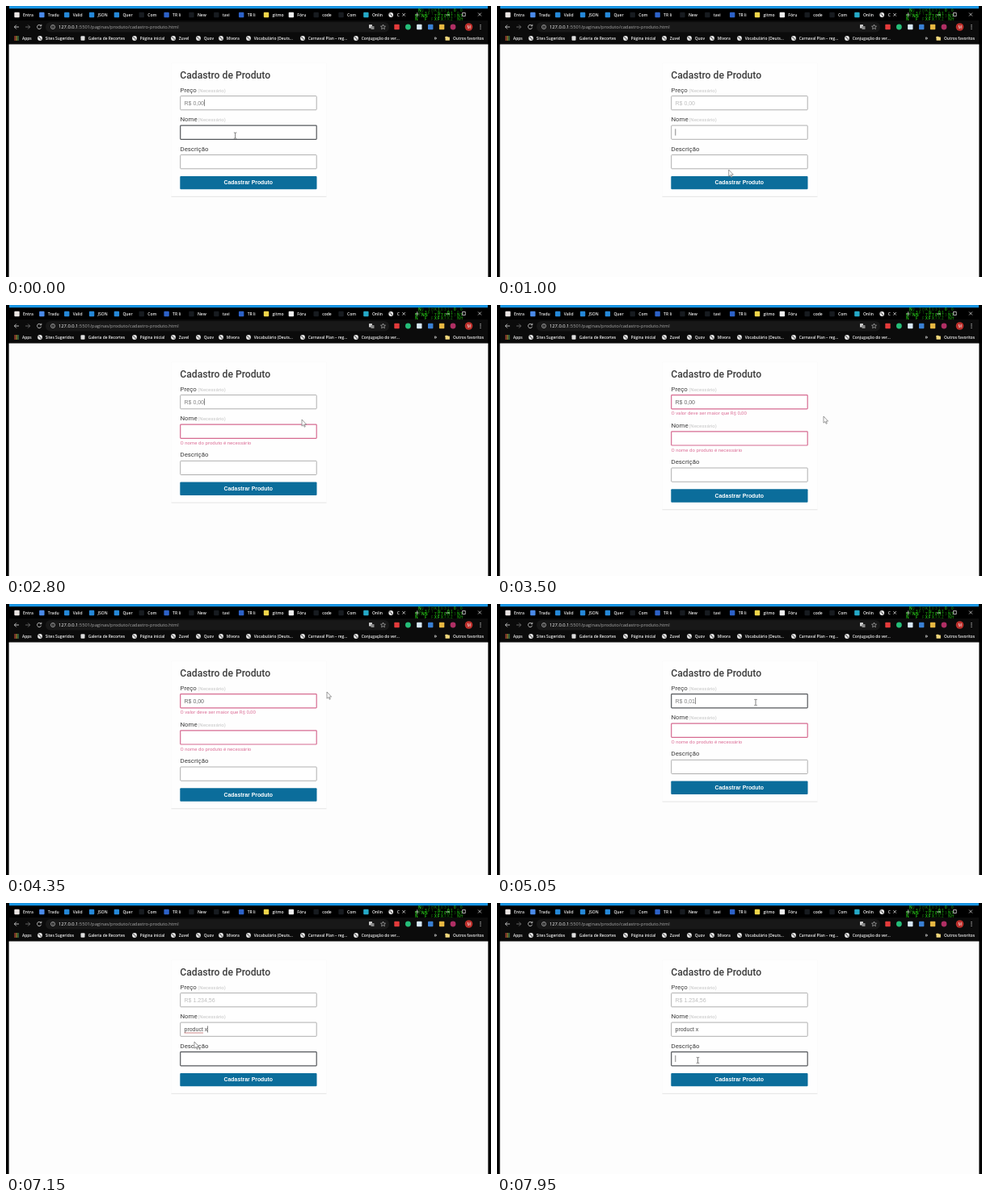
An HTML page that plays this animation: 600x336 px, repeating every 8000 ms.

```html
<!DOCTYPE html>
<html lang="pt-BR">
<head>
<meta charset="utf-8">
<title>Cadastro de Produto</title>
<style>
  html, body { margin: 0; width: 100%; height: 100%; overflow: hidden; background: #000; }
  svg { display: block; width: 600px; height: 336px; }
  text { white-space: pre; }
  .ui { font-family: "Open Sans", sans-serif; }
  .form { font-family: Roboto, sans-serif; fill: #3c3c3c; }
  .label { font-size: 7.85px; }
  .hint { font-size: 6.04px; fill: #c4c4c4; }
  .error { font-size: 6.08px; fill: #dc6f97; }
  .value { font: 7px "Liberation Sans", Arial, sans-serif; }
  .box { fill: #fff; }
</style>
</head>
<body>
<svg id="stage" viewBox="0 0 600 336">
  <rect width="600" height="336"/>
  <rect x="4" width="592" height="3.2" fill="#1995e3"/>
  <g id="chrome"></g>
  <rect x="3.6" y="47.5" width="592.8" height="288.5" fill="#fdfdfd"/>
  <g id="page"></g>
  <path id="arrow" d="M0 0V8.2L1.9 6.5 3.2 9.3 4.3 8.8 3.1 6.1H5.6Z" fill="#fff" stroke="#666" stroke-width=".65"/>
  <path id="beam" d="M-1.7-3.6H-.5L0-3.2.5-3.6H1.7M0-3.2V3.2M-1.7 3.6H-.5L0 3.2.5 3.6H1.7" fill="none" stroke="#555" stroke-width=".75"/>
</svg>
<script>
const LOOP = 8000, ERROR_HEIGHT = 8.7;
const byId = id => document.getElementById(id);
const chrome = byId('chrome'), page = byId('page');

function add(parent, tag, attrs, content) {
  const node = document.createElementNS('http://www.w3.org/2000/svg', tag);
  set(node, attrs);
  if (content !== undefined) node.textContent = content;
  parent.append(node);
  return node;
}
function set(node, attrs) {
  for (const key in attrs) node.setAttribute(key, attrs[key]);
}
const show = (node, on) => set(node, { visibility: on ? 'visible' : 'hidden' });
const uiText = (x, y, size, content, fill = '#f0f0f0', weight = 600) =>
  add(chrome, 'text', { x, y, class: 'ui', 'font-size': size, 'font-weight': weight, fill }, content);
const line = (d, stroke = '#ddd', width = .8) =>
  add(chrome, 'path', { d, stroke, 'stroke-width': width, fill: 'none' });
const dot = (cx, cy, r, fill) => add(chrome, 'circle', { cx, cy, r, fill });
const block = (x, y, width, height, fill, rx = 0) =>
  add(chrome, 'rect', { x, y, width, height, fill, rx });

function globe(x, y) {
  dot(x, y, 2.9, '#eee');
  line(`M${x - 2} ${y - 1}q2-1 2 1t2 1`, '#333', .8);
}

function drawTabs() {
  const tabs = [
    ['Entra', '#e9e4e2'], ['Tradu', '#4a8ae8'], ['Valid', '#2588d8'], ['JSON', '#2588d8'],
    ['Quer', '#2588d8'], ['Com', '#171b20'], ['TR li', '#2d62c8'], ['New', '#171b20'],
    ['tavi', '#171b20'], ['TR li', '#2d62c8'], ['gitmo', '#f0d54a'], ['Fóru', '#eee'],
    ['code', '#171b20'], ['Com', '#171b20'], ['Onlin', '#25a9c7'], ['C', null]
  ];
  tabs.forEach(([name, color], i) => {
    const x = 13.5 + i * 30.85;
    if (color) block(x - 3.2, 7.8, 6.4, 6.4, color, 1);
    else globe(x, 11);
    uiText(x + 7.5, 13, 5, name);
  });
  line('M490.3 9l3.6 3.6m0-3.6l-3.6 3.6M506 11h5.4M508.7 8.3v5.4');
}

function drawRain() {
  let seed = 17;
  const random = () => (seed = seed * 16807 % 2147483647) / 2147483647;
  const glyphs = '01ZXKNH7F3';
  for (let x = 506; x < 566; x += 4) {
    for (let y = 7; y < 20; y += 3.6) {
      if (random() < .25) continue;
      const fill = `hsl(115 85% ${16 + random() * 40 | 0}%)`;
      uiText(x, y, 4.6, glyphs[random() * glyphs.length | 0], fill);
    }
  }
  line('M544 11h5M564.5 8.5h3.8v4h-3.8zM584 8.5l4 4m0-4l-4 4', '#eee', .7);
}

function drawToolbar() {
  block(4, 18, 592, 30, '#0b0b0b');
  block(49, 20, 425, 12.5, '#181818', 6);
  line('M16 26h-5.6m2.4-2.5l-2.5 2.5 2.5 2.5');
  line('M24 26h5.6m-2.4-2.5l2.5 2.5-2.5 2.5', '#777');
  line('M43.2 24.4a2.6 2.6 0 1 0 .4 2.3M43.8 22.8v2h-2');
  add(chrome, 'circle', { cx: 58, cy: 26, r: 2.5, fill: 'none', stroke: '#ccc', 'stroke-width': .7 });
  line('M58 25.5v1.8M58 24.2v.6', '#ccc', .7);
  const url = uiText(65, 28, 5.76, '127.0.0.1', '#fff', 400);
  add(url, 'tspan', { fill: '#aaa' }, ':5501/paginas/produto/cadastro-produto.html');

  block(449, 23, 4, 4.5, '#ccc', .5);
  block(451.5, 25, 4, 4, '#888', .5);
  line('M466.5 23l.9 2 2.1.2-1.6 1.4.5 2.1-1.9-1.1-1.9 1.1.5-2.1-1.6-1.4 2.1-.2z', '#ccc', .6);
  ['#e33b3b', '#25bd79', '#d7e8f5', '#3a80d4', '#e8b842', '#b02f64'].forEach((fill, i) => {
    const x = 483.5 + i * 13.9;
    if (i === 1 || i === 5) dot(x, 26, 3.4, fill);
    else block(x - 3.2, 22.8, 6.4, 6.4, fill, .8);
  });
  dot(572.5, 26, 4.8, '#bd302c');
  uiText(570.4, 27.8, 5, 'M', '#fff', 400);
  for (const y of [23.7, 26, 28.3]) dot(587, y, .65, '#ddd');
}

function drawBookmarks() {
  const colors = ['#e35545', '#e8c145', '#55a865'];
  for (let i = 0; i < 9; i++) block(10.3 + i % 3 * 2, 37.3 + (i / 3 | 0) * 2, 1.4, 1.4, colors[i % 3]);
  uiText(20, 42, 4.85, 'Apps');
  const marks = [
    [42, 'Sites Sugeridos'], [95, 'Galeria de Recortes'], [159, 'Página inicial'],
    [207, 'Zuvel'], [238, 'Quov'], [266, 'Mivora'], [300, 'Vocabulário (Deuts...'],
    [367, 'Carnaval Plan – reg...'], [433, 'Conjugação do ver...']
  ];
  marks.forEach(([x, name], i) => {
    if (i === 1) block(x - 2.5, 37.3, 5, 5.4, '#ddd', 1);
    else globe(x, 40);
    uiText(x + 6.7, 42, 4.85, name);
  });
  uiText(529.5, 42, 6.5, '»');
  block(543.5, 37.8, 3, 2, '#f0d77c', .4);
  block(543.5, 38.4, 5.4, 4.3, '#f0d77c', .4);
  uiText(553, 42, 4.85, 'Outros favoritos');
}

drawTabs();
drawRain();
drawToolbar();
drawBookmarks();

const card = add(page, 'rect', { x: 204.5, y: 71, width: 192, fill: '#fefefe', stroke: '#fafafa', 'stroke-width': .8 });
const cardEdge = add(page, 'path', { d: 'M204.5 236.4h192', stroke: '#e4e4e4', 'stroke-width': .9 });
add(page, 'text', { x: 215.3, y: 90, class: 'form', 'font-size': 12.15, 'font-weight': 500 }, 'Cadastro de Produto');

function makeField(top, label, hint, message) {
  const group = add(page, 'g', {});
  add(group, 'text', { x: 215.5, y: top - 4.8, class: 'form label' }, label);
  if (hint) add(group, 'text', { x: 237.3, y: top - 5, class: 'form hint' }, hint);
  return {
    top, group,
    box: add(group, 'rect', { x: 215.7, y: top, width: 168.5, height: 17.2, rx: .8, class: 'box' }),
    value: add(group, 'text', { x: 220.5, y: top + 11, class: 'value' }),
    caret: add(group, 'rect', { y: top + 4.3, width: .7, height: 8.2, fill: '#555' }),
    error: add(group, 'text', { x: 215.5, y: top + 24.8, class: 'form error' }, message)
  };
}
const fields = {
  price: makeField(111.6, 'Preço', '(Necessário)', 'O valor deve ser maior que R$ 0,00'),
  name: makeField(148.1, 'Nome', '(Necessário)', 'O nome do produto é necessário'),
  details: makeField(184.6, 'Descrição', '', '')
};
const spelling = add(fields.name.group, 'path', { d: 'M220.5 161h23.5', stroke: '#a33', 'stroke-width': .6 });
const button = add(page, 'g', {});
add(button, 'rect', { x: 215.3, y: 210.9, width: 169.2, height: 16.4, rx: 1, fill: '#0b6d9b' });
add(button, 'text', {
  x: 299.8, y: 221.4, 'text-anchor': 'middle', class: 'value', style: 'font-weight:700;font-size:6.9px;fill:#fff'
}, 'Cadastrar Produto');

// Pointer stops: time, x, y
const stops = [
  [0, 283.6, 160.6], [550, 283.6, 160.6], [1000, 286.7, 203], [1400, 412, 180], [1700, 412, 180],
  [2250, 310, 121], [2400, 310, 121], [2800, 366, 142], [3050, 404, 138], [3500, 404, 138],
  [4350, 397, 109], [4800, 320, 122], [5200, 320, 122], [5950, 320.5, 129],
  [6250, 290, 157], [6800, 290, 157], [7150, 233, 172], [7450, 248, 194], [8000, 248.5, 195]
];
// Focus changes: time, field
const focusSteps = [[0, 'price'], [500, 'name'], [1450, ''], [2300, 'price'], [3100, ''],
  [4850, 'price'], [6300, 'name'], [7480, 'details']];
// Typing: start, time per key, keys
const typing = { price: [5000, 140, 6], name: [6400, 75, 9] };

function pointerAt(t) {
  const i = stops.findIndex(stop => stop[0] > t);
  const [t0, x0, y0] = stops[i - 1], [t1, x1, y1] = stops[i];
  const p = (t - t0) / (t1 - t0), ease = p * p * (3 - 2 * p);
  return { x: x0 + (x1 - x0) * ease, y: y0 + (y1 - y0) * ease };
}
function typedCount(key, t) {
  const [start, step, count] = typing[key];
  return Math.max(0, Math.min(count, Math.floor((t - start) / step) + 1));
}
function money(digits) {
  const cents = String(Number(digits)).padStart(3, '0');
  return 'R$ ' + cents.slice(0, -2).replace(/\B(?=(\d{3})+$)/g, '.') + ',' + cents.slice(-2);
}

function render(t) {
  const pointer = pointerAt(t);
  const [focusTime, focus] = focusSteps.filter(step => step[0] <= t).pop();
  const priceCount = typedCount('price', t), nameCount = typedCount('name', t);
  const values = { price: money('123456'.slice(0, priceCount)), name: 'product x'.slice(0, nameCount), details: '' };
  const errors = { price: t >= 3100 && t < 5000, name: t >= 1450 && t < 6875, details: false };
  let shift = 0, overInput = false;

  for (const key in fields) {
    const field = fields[key], failed = errors[key], active = focus === key;
    const top = field.top + shift;
    const inside = pointer.x > 215 && pointer.x < 384.5 && pointer.y > top && pointer.y < top + 17.5;
    const onLabel = pointer.x > 215 && pointer.x < 251 && pointer.y > top - 13 && pointer.y <= top;
    const hovered = inside || onLabel;
    overInput ||= inside;
    set(field.group, { transform: `translate(0 ${shift})` });
    set(field.box, {
      stroke: failed ? '#d66b91' : hovered ? '#55585c' : '#a6a6a6',
      'stroke-width': failed || hovered ? 1.2 : .9
    });
    field.value.textContent = values[key];
    const priceColor = failed ? '#666' : active ? '#808080' : '#bebebe';
    set(field.value, { fill: key === 'price' ? priceColor : '#444' });

    let anchor = focusTime;
    if (typing[key]) {
      const count = typedCount(key, t);
      if (count) anchor = Math.max(anchor, typing[key][0] + (count - 1) * typing[key][1]);
    }
    set(field.caret, { x: 220.5 + (values[key] ? field.value.getComputedTextLength() : 0) });
    show(field.caret, active && (t - anchor) % 1060 < 530);
    show(field.error, failed);
    if (failed) shift += ERROR_HEIGHT;
  }
  show(spelling, focus === 'name' && nameCount >= 8);
  const moved = { transform: `translate(0 ${shift})` };
  set(button, moved);
  set(cardEdge, moved);
  set(card, { height: 165.2 + shift });
  const place = { transform: `translate(${pointer.x} ${pointer.y})` };
  set(byId('arrow'), place);
  set(byId('beam'), place);
  show(byId('arrow'), !overInput);
  show(byId('beam'), overInput);
}

function tick() {
  render(Math.floor(performance.now() % LOOP / 50) * 50);
  requestAnimationFrame(tick);
}
tick();
</script>
</body>
</html>
```
